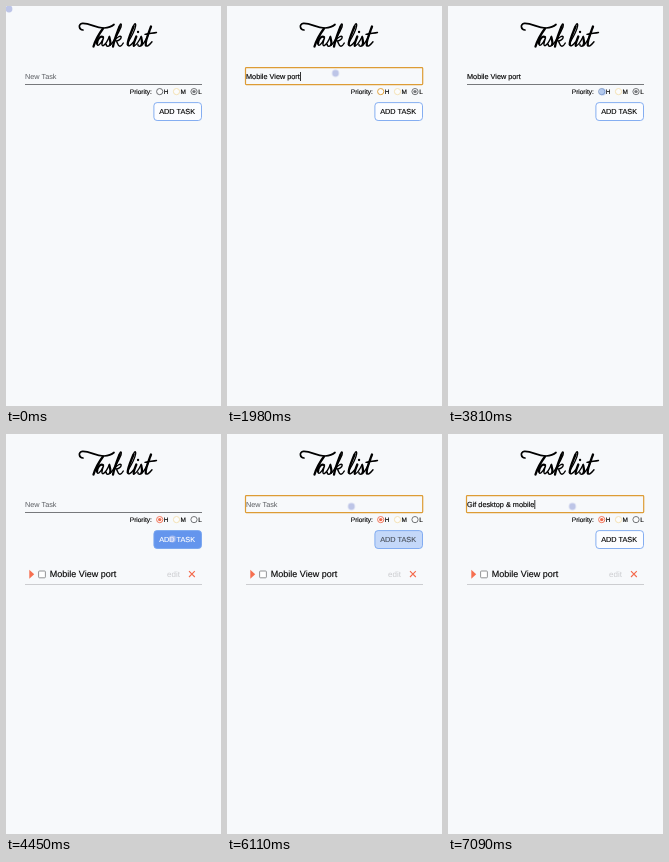
An HTML page that plays this animation: 215x400 px, repeating every 8000 ms.

```html
<!DOCTYPE html>
<html lang="en">
<head>
<meta charset="utf-8">
<title>Task list</title>
<style>
  html, body { margin: 0; width: 100%; height: 100%; overflow: hidden; background: #f7f9fb; }
  svg { display: block; width: 100%; height: 100%; }
  text {
    font: 7.3px "Liberation Sans", Arial, sans-serif;
    text-rendering: geometricPrecision;
    fill: #000; stroke: #000; stroke-width: .14px;
  }
  .small { font-size: 6.5px; }
  .title { fill: none; stroke: #000; stroke-width: 1.4; stroke-linecap: round; stroke-linejoin: round; }
  .title .heavy { stroke-width: 2.3; }
  .radio { fill: #fbfcfd; stroke-width: .9; }

  /* every state change is a hard cut on one shared 8 s loop */
  .hint, .line, .focus, .first, .caret, .second, .dot, .ring, .pick, .unpick,
  .button, .label, .row { animation: 8s step-end infinite; }
  .hint { animation-name: hint; fill: #5b5e62; stroke: none; }
  .line { animation-name: line; }
  .focus { animation-name: focus; }
  .first { animation-name: first; }
  .caret { animation-name: caret; }
  .second { animation-name: second; }
  .dot { animation-name: dot; }
  .ring { animation-name: ring; }
  .pick { animation-name: pick; }
  .unpick { animation-name: unpick; }
  .button { animation-name: button; stroke: #78a5f0; stroke-width: .9; }
  .label { animation-name: label; }
  .row { animation-name: row; }

  @keyframes hint {
    0%, 53.625% { visibility: visible; }
    24.75%, 88.625%, 100% { visibility: hidden; }
  }
  @keyframes line {
    0%, 47.625% { visibility: visible; }
    12.375%, 76.375%, 100% { visibility: hidden; }
  }
  @keyframes focus {
    0%, 47.625% { visibility: hidden; }
    12.375%, 76.375%, 100% { visibility: visible; }
  }
  @keyframes first {
    0%, 53.625%, 100% { visibility: hidden; }
    24.75% { visibility: visible; }
  }
  @keyframes caret {
    0%, 47.625%, 100% { visibility: hidden; }
    24.75% { visibility: visible; }
  }
  @keyframes second {
    0% { visibility: hidden; }
    88.625%, 100% { visibility: visible; }
  }
  @keyframes dot {
    0% { transform: translate(3px, 3px); fill: #929fd9; }
    12.375% { transform: translate(108.5px, 67.3px); fill: #929fd9; }
    47.625% { transform: translate(154.5px, 86px); fill: #7fa3e2; }
    53.625% { transform: translate(166.4px, 105px); fill: #dcdcf5; }
    76.375%, 100% { transform: translate(124.4px, 72.5px); fill: #929fd9; }
  }
  @keyframes ring {
    0% { stroke: #5c5e62; }
    12.375% { stroke: #df9a2c; }
    47.625% { stroke: #7c93ba; }
    49.625%, 100% { stroke: #f0694c; }
  }
  @keyframes pick {
    0% { visibility: hidden; }
    49.625%, 100% { visibility: visible; }
  }
  @keyframes unpick {
    0% { opacity: 1; }
    49.625% { opacity: .35; }
    51.625%, 100% { opacity: 0; }
  }
  @keyframes button {
    0%, 78.375%, 100% { fill: #fcfdff; }
    53.625% { fill: #a9c4f5; }
    55.625% { fill: #6495ed; }
    76.375% { fill: #c4d8f9; }
  }
  @keyframes label {
    0%, 78.375%, 100% { fill: #000; stroke: #000; }
    53.625% { fill: #666d79; stroke: #666d79; }
    55.625% { fill: #fff; stroke: #fff; }
    76.375% { fill: #4a515c; stroke: #4a515c; }
  }
  @keyframes row {
    0% { visibility: hidden; }
    55.625%, 100% { visibility: visible; }
  }
</style>
</head>
<body>
<svg viewBox="0 0 215 400">
  <g class="title" role="img" aria-label="Task list">
    <!-- T -->
    <path class="heavy" d="M97 22.5C93 28 89.5 34 87.5 40.5"/>
    <path d="M77 24C73 24 71.6 18 76.5 17.4C84 17 90 22.4 98 22C102.5 21.7 106 20.3 108 18.5" stroke-width="1.7"/>
    <!-- ask -->
    <path class="heavy" d="M97 31C94 29.5 91 34 91 37.5M103.5 31.5C103.8 34.5 105.3 36.5 104 38.8M113.5 20.5C111 27 108.3 33.5 107 40.5"/>
    <path d="M91 37.5C91 41 94.5 39 97.5 32C96 36 95 40.3 97.3 39.6C99.5 38.5 102 34 103.5 30.3M104 38.8C103 41 100 40.5 100.3 38.5M104 39.3C107 37 112.5 27 115 21C116 17.5 114.3 16.5 113.5 20.5M108.5 35C111 31 114.8 29 115.2 31C115.2 33.5 112 35 110 35C112 36 111.5 40.5 114 40.2C115.5 40 116.5 38.5 117.3 37"/>
    <!-- list -->
    <path class="heavy" d="M127.5 20.5C125 27 121.5 34 121.7 38.5M130.3 30.5C129 34 127 38 127.8 39.8M135.3 31.5C135.5 34.5 137 36.5 135.5 39M145 20.5C143 26 138.8 36 139.8 39.2M132 26h.1"/>
    <path d="M122 36.5C125 31.5 129 24 129.6 20C130 17 128.3 17 127.5 20.5M121.7 38.5C122.3 41.5 125.5 38.5 127.5 36M127.8 39.8C130 40 133.5 34 135.3 30.3M135.5 39C134 41 131.5 40.3 132 38.5M135.5 39.5C138 37.5 141 32 143.5 26M139.8 39.2C140.5 41.5 143.5 39 146 35.8M139 28.3C142.5 27.3 147 27.3 150.5 26.5"/>
  </g>

  <path class="line" d="M19 78.5H196" stroke="#77797c"/>
  <rect class="focus" x="18.5" y="61.6" width="177.2" height="17" rx=".8" fill="none" stroke="#dd9c35" stroke-width="1.2"/>
  <text class="hint" x="19" y="72.7">New Task</text>
  <text class="first" x="19" y="72.7">Mobile View port</text>
  <path class="caret" d="M73.5 66V75" stroke="#000" stroke-width=".8"/>
  <g class="second">
    <text x="19" y="72.7">Gif desktop &amp; mobile</text>
    <path d="M86.8 66V75" stroke="#000" stroke-width=".8"/>
  </g>

  <text class="small" x="123.8" y="88">Priority:</text>
  <circle class="radio ring" cx="153.7" cy="85.6" r="3.1"/>
  <circle class="pick" cx="153.7" cy="85.6" r="1.7" fill="#f0694c"/>
  <text class="small" x="157.8" y="88">H</text>
  <circle class="radio" cx="170.5" cy="85.6" r="3.1" stroke="#f3dfae"/>
  <text class="small" x="174.6" y="88">M</text>
  <circle class="radio" cx="188" cy="85.6" r="3.1" stroke="#66686b"/>
  <circle class="unpick" cx="188" cy="85.6" r="1.7" fill="#77797c"/>
  <text class="small" x="192.2" y="88">L</text>

  <rect class="button" x="147.9" y="96.6" width="47.6" height="17.9" rx="3.2"/>
  <text class="label" x="153.2" y="108.2">ADD TASK</text>

  <g class="row">
    <path d="M23.3 135.8L28.2 140.3L23.3 144.8Z" fill="#f66f50"/>
    <rect x="32.6" y="137" width="6.8" height="6.8" rx=".9" fill="#fff" stroke="#77797c" stroke-width=".8"/>
    <text x="43.8" y="143.4" style="font-size:9px">Mobile View port</text>
    <text x="161" y="143" style="font-size:8px;fill:#cbcccf;stroke:none">edit</text>
    <path d="M183 137.2L188.8 143M188.8 137.2L183 143" stroke="#f4694b" stroke-width="1.1"/>
    <path d="M19 150.5H196" stroke="#cccdd0"/>
  </g>

  <circle class="dot" r="3.4" opacity=".58"/>
</svg>
</body>
</html>
```
